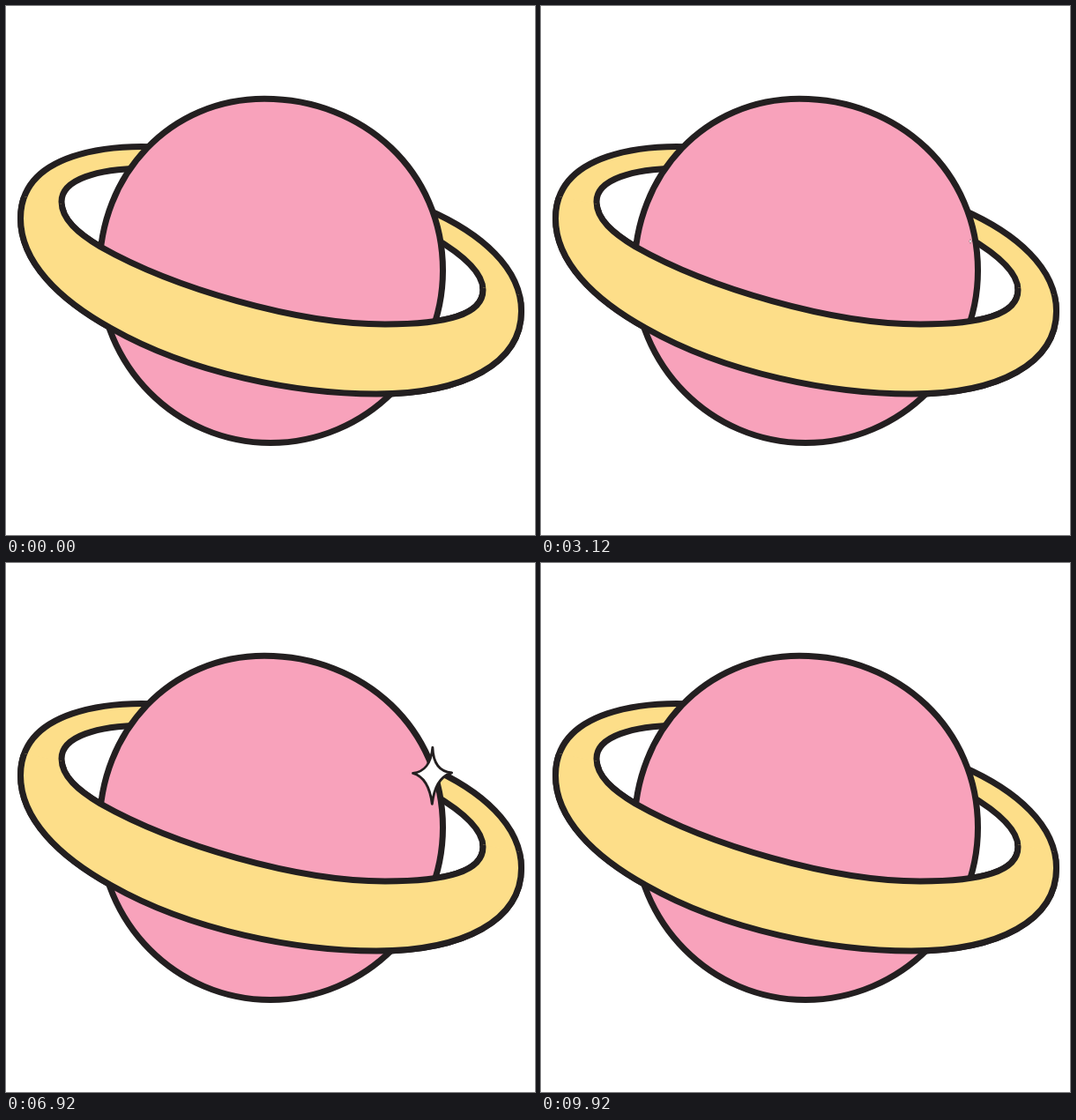
Recreate the animation shown at these times as an HTML page with a canvas. Size 600x600 px, loop 10 s.

```html
<!DOCTYPE html>
<html lang="en">
<head>
<meta charset="utf-8">
<title>Ringed planet</title>
<style>
  html, body { margin: 0; width: 100%; height: 100%; overflow: hidden; background: #fff; }
  canvas { display: block; width: 600px; height: 600px; }
</style>
</head>
<body>
<canvas id="stage" width="600" height="600"></canvas>
<script>
const ctx = document.getElementById('stage').getContext('2d');
const LOOP = 10000, STEP = 40, SWEEP = 3700, BANDS = 20;
const INK = '#231f20', YELLOW = '#fdde89';
const PINK = [248, 162, 187], PALE = [247, 218, 223];

const planet = new Path2D('M293 105.3C406 105.3 495.5 188 495.5 300C495.5 408 408 495.5 300 495.5C193 495.5 106 408 106 300C106 190 187 105.3 293 105.3Z');
const ringOuter = new Path2D('M175 160C120 157 16.5 165 16.5 241C16.5 290 60 333 120 366C210 417 330 440 420 440C520 440 584.5 405 584.5 346C584.5 298 540 258 478 231');
const ringInner = new Path2D('M155 184C105 185 63 196 63 222C63 242 82 258 107 273C190 320 330 361 430 361C500 361 541 350 541 322C541 303 520 283 484 262');
const ringBand = new Path2D(ringOuter);
ringBand.addPath(ringInner);
const frontHalf = new Path2D('M0 212L600 331V600H0Z');
const star = new Path2D('M1 -56C2 -28 12 -8 39 -6C14 2 4 24 0 56C-4 24 -14 2 -38 -5C-14 -8 -2 -24 1 -56Z');

// Size is the half height at the peak; drift moves the centre as the star grows.
const sparkles = [
  { x: 58, y: 300, start: 100, peak: 340, end: 1000, size: 57, drift: 0 },
  { x: 103, y: 264, start: 1180, peak: 1430, end: 2240, size: 40, drift: 0 },
  { x: 487, y: 267, start: 3100, peak: 3400, end: 4200, size: 40, drift: 0 },
  { x: 474, y: 232, start: 6740, peak: 7060, end: 9300, size: 57, drift: 0.29 },
  { x: 125, y: 361, start: 8380, peak: 8710, end: 9200, size: 57, drift: 0 }
];

const mix = (a, b, k) => `rgb(${a.map((v, i) => Math.round(v + (b[i] - v) * k))})`;
const paleEdge = y => 32 * Math.cos((y - 295) * Math.PI / 57.5);
const pinkEdge = y => 0.7 * (300 - y);

// Soft front moving right: successive areas left of the edge step from one colour to the other.
function drawFront(lead, width, edge, from, to) {
  for (let k = 1; k <= BANDS; k++) {
    const base = lead - width * k / BANDS;
    ctx.beginPath();
    ctx.moveTo(-600, 95);
    for (let y = 95; y <= 505; y += 5) ctx.lineTo(base + edge(y), y);
    ctx.lineTo(-600, 505);
    ctx.fillStyle = mix(from, to, k / BANDS);
    ctx.fill();
  }
}

function drawPlanet(phase) {
  ctx.save();
  ctx.clip(planet);
  ctx.fillStyle = `rgb(${PINK})`;
  ctx.fillRect(0, 0, 600, 600);
  if (phase > 0 && phase < 2560) {
    drawFront(80 + 0.555 * phase, 200, paleEdge, PINK, PALE);
    if (phase > 1150) drawFront(50 + 0.5 * (phase - 1150), 200, pinkEdge, PALE, PINK);
  }
  ctx.restore();
  ctx.stroke(planet);
}

function drawRing() {
  ctx.fillStyle = YELLOW;
  ctx.fill(ringBand, 'evenodd');
  ctx.stroke(ringOuter);
  ctx.stroke(ringInner);
}

function drawSparkle({ x, y, start, peak, end, size, drift }, t) {
  if (t <= start || t >= end) return;
  const grow = t < peak ? (t - start) / (peak - start) : (end - t) / (end - peak);
  const half = size * grow;
  ctx.save();
  ctx.translate(x + drift * half, y + drift * half);
  ctx.scale(half / 56, half / 56);
  ctx.lineWidth = 5;
  ctx.fillStyle = '#fff';
  ctx.fill(star);
  ctx.stroke(star);
  ctx.restore();
}

function draw(t) {
  ctx.fillStyle = '#fff';
  ctx.fillRect(0, 0, 600, 600);
  ctx.strokeStyle = INK;
  ctx.lineWidth = 7;
  ctx.lineJoin = 'round';
  drawRing();
  drawPlanet(t % SWEEP);
  ctx.save();
  ctx.clip(frontHalf);
  drawRing();
  ctx.restore();
  sparkles.forEach(s => drawSparkle(s, t));
}

const origin = performance.now();
function tick() {
  const t = (performance.now() - origin) % LOOP;
  draw(Math.min(Math.floor(t / STEP) * STEP, LOOP - 2 * STEP));
  requestAnimationFrame(tick);
}
tick();
</script>
</body>
</html>
```
